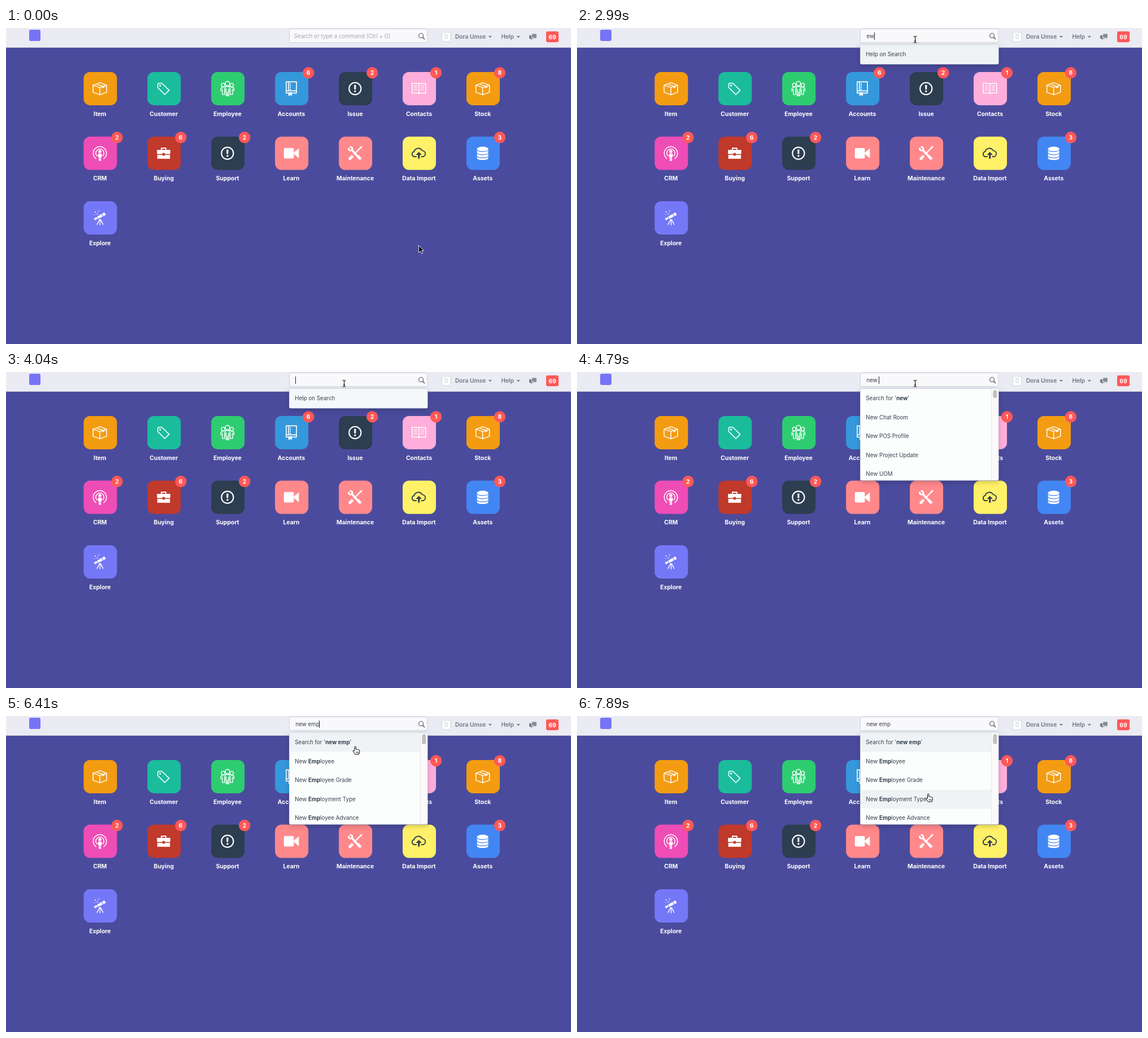
These frames come from a looping animation (1000x560 px, 8000 ms). An HTML page:

```html
<!DOCTYPE html>
<html lang="en">
<head>
<meta charset="utf-8">
<title>Desk search</title>
<style>
  html, body { margin: 0; width: 100%; height: 100%; overflow: hidden; background: #4b4b9d; }
  svg { display: block; width: 100%; height: 100%; }
  text { font: 9.8px Inter, "Open Sans", sans-serif; fill: #36414c; white-space: pre; }
  .b { font-weight: 700; }
  .label { font-size: 10.4px; font-weight: 700; fill: #fff; text-anchor: middle; }
  .nav { font-size: 10.2px; font-weight: 600; fill: #6c7680; }
  .ln { fill: none; stroke: #fff; stroke-width: 1.5; stroke-linejoin: round; }
  .drop { filter: drop-shadow(0 3px 4px rgba(0, 0, 0, .18)); }
</style>
</head>
<body>
<svg id="stage" viewBox="0 0 1000 560"></svg>
<script>
const LOOP = 8000, ROW = 33.6;
const line = (d, w = 1.5, c = '#fff') => `<path class="ln" d="${d}" style="stroke:${c};stroke-width:${w}"/>`;
const fill = (d, c = '#fff') => `<path d="${d}" fill="${c}"/>`;
const disc = (x, y, r, c = '#fff') => `<circle cx="${x}" cy="${y}" r="${r}" fill="${c}"/>`;
const ring = (x, y, r, w = 1.5) => `<circle class="ln" cx="${x}" cy="${y}" r="${r}" style="stroke-width:${w}"/>`;
const box = (x, y, w, h, r, c, more = '') =>
  `<rect x="${x}" y="${y}" width="${w}" height="${h}" rx="${r}" fill="${c}" ${more}/>`;
const label = (x, y, s, cls = 'label') => `<text class="${cls}" x="${x}" y="${y}">${s}</text>`;

// Icons, drawn around 0,0
const icons = {
  box: line('M-12-6L0-10.5L12-6V6.5L0 11L-12 6.5ZM-12-6L0-2L12-6M0-2V11M-6.5-8.2L5.5-4') +
    fill('M4.6-4.6L8.4-6V-2L4.6-.5Z'),
  tag: line('M-10.5-6.8a2.8 2.8 0 0 1 2.8-2.8h4.4L9.7 3L2 10.6L-10.5-2Z') + ring(-6.3, -5.4, 1.1, 1.2),
  team: ring(0, -8.8, 4) + ring(-7.6, -6.4, 3.1, 1.3) + ring(7.6, -6.4, 3.1, 1.3) +
    line('M-4.5 5V-1.5Q-4.5-4 0-4T4.5-1.5V5M-2.4 0V12.5H2.4V0M0 5V12', 1.5) +
    line('M-6-2.5Q-11.5-3-11.5 0V5M-9 0V10.5H-5V3M6-2.5Q11.5-3 11.5 0V5M9 0V10.5H5V3', 1.4),
  ledger: line('M-4.5 8H-9V-12H9.2V8H1M-9 4H9M-5-12V4', 1.6) +
    fill('M-3-9.6h2v2h-2zM-3-6.3h2v2h-2zM-3-3h2v2h-2zM-3 .3h2v2h-2zM-5 6.5H1V13.5L-2 11L-5 13.5Z'),
  alert: ring(0, 0, 10.6, 2.1) + fill('M-1.7-6.5H1.7L1.3 1.5H-1.3Z') + disc(0, 4.7, 1.7),
  book: line('M0-8.2Q-1.5-9.3-4-9.3H-12V7.8H-3.5Q-1 7.8 0 9Q1 7.8 3.5 7.8H12V-9.3H4Q1.5-9.3 0-8.2V9') +
    line('M-9-5H-3M-9-1.3H-3M-9 2.4H-3M3-5H9M3-1.3H9M3 2.4H9', 1.3),
  cast: line('M-6.5 9.8A11.7 11.7 0 1 1 6.5 9.8M-5 5A7.2 7.2 0 1 1 5 5') + disc(0, -3, 2.8) +
    fill('M-3.5 1.5Q0-.6 3.5 1.5V6.5H2V13.5H-2V6.5H-3.5Z') + line('M0 7V12', .8, '#ef4db6'),
  bag: fill('M-11.7-6H11.7V1.2H2V-.4H-2V1.2H-11.7ZM-11.2 2.7H-2V4.2H2V2.7H11.2V9.7H-11.2Z') +
    line('M-4-6V-9H4V-6', 1.8),
  video: box(-13, -9.3, 17.5, 18.6, 1.8, '#fff') + fill('M4.5-1.2L13.5-8.8V8.8L4.5 1.2Z'),
  tools: line('M-6-6L8.5 9.5', 3.6) + ring(-8, -8, 3.2, 2.8) + fill('M-9-9L-14-10L-10-14Z', '#ff888b') +
    line('M-10.5 11L-4 4.5', 4.6) + line('M-2 2L10-10', 2.4) + fill('M8-10.5L12-13L13.2-11.8L10.5-8Z') +
    line('M4.5 5L10.5 11', 5) + disc(9.4, 10, .9, '#ff888b'),
  cloud: line('M-4 6H-8A4.6 4.6 0 0 1-8.3-3A7.7 7.7 0 0 1 6-4.6A5.4 5.4 0 0 1 7.5 6H4', 1.9, '#36414c') +
    fill('M0-2.5L5.3 3H1.6V9.5H-1.6V3H-5.3Z', '#36414c'),
  data: fill('M-10-7.5V8.5C-10 13.2 10 13.2 10 8.5V-7.5Z') +
    '<ellipse cy="-7.8" rx="10" ry="3.9" fill="#fff"/>' +
    line('M-10-6.5C-10-2 10-2 10-6.5M-10-.8C-10 3.7 10 3.7 10-.8M-10 4.8C-10 9.3 10 9.3 10 4.8', 1.2, '#4286f4'),
  scope: fill('M-10.5 1.2L-5.5-1.8L-3.6 1.4L-8.8 4.2ZM-4.6-2.4L3-7L5.5-2.8L-2.6 1.6ZM4-7.5L8-9.8L10.6-5.5L6.5-3.2Z') +
    line('M.5 2.5V13M-.2 2.5L-5 12M1.2 2.5L6 12', 1.4) +
    disc(-8, -10.5, 1) + disc(-2, -12, .9) + disc(-4.5, -7, 1) + disc(-9.5, -6, .7)
};

const tiles = [
  ['Item', '#f39c12', 'box'], ['Customer', '#1abc9c', 'tag'], ['Employee', '#2ecc71', 'team'],
  ['Accounts', '#3498db', 'ledger', 6], ['Issue', '#2c3e50', 'alert', 2],
  ['Contacts', '#ffaedb', 'book', 1], ['Stock', '#f39c12', 'box', 8],
  ['CRM', '#ef4db6', 'cast', 2], ['Buying', '#c0392b', 'bag', 6], ['Support', '#2c3e50', 'alert', 2],
  ['Learn', '#ff888b', 'video'], ['Maintenance', '#ff888b', 'tools'],
  ['Data Import', '#fff168', 'cloud'], ['Assets', '#4286f4', 'data', 3],
  ['Explore', '#7578f6', 'scope']
];

function tile([name, color, icon, count], i) {
  const x = 166.9 + (i % 7) * 112.92, y = 107.4 + Math.floor(i / 7) * 114.6;
  return `<g transform="translate(${x} ${y})">` + box(-29.5, -29.5, 59, 59, 11.5, color) +
    `<g transform="translate(-.8 0)">${icons[icon]}</g>` + label(-.6, 48.2, name) +
    (count ? disc(29.6, -28, 10.2, '#ff5858') + label(29.4, -24.2, count) : '') + '</g>';
}

const header = box(0, 0, 1000, 34.5, 0, '#ebebf4') + box(0, 34, 1000, .8, 0, '#d1d3e0') +
  box(41, 3, 20, 20, 3, '#7574f6') +
  box(501.5, 1.5, 244.5, 24.5, 2, '#f9f9fb', 'stroke="#cdd1d8"') +
  '<circle cx="734.5" cy="13.5" r="4" fill="none" stroke="#4d5560" stroke-width="1.1"/>' +
  line('M737.4 16.4L741 20', 1.5, '#4d5560') +
  box(771.5, 7.5, 15.5, 16.5, 2, '#fff', 'stroke="#d1d8dd"') +
  '<text x="779.2" y="19.4" text-anchor="middle" style="fill:#c3c6ca">D</text>' +
  label(795, 18.8, 'Dora Umse', 'nav') + label(876.5, 18.8, 'Help', 'nav') +
  fill('M853.5 14h6.6l-3.3 3.4zM903.5 14h6.6l-3.3 3.4z', '#7b858e') +
  fill('M931 10.5h8v6.5h-1.3v2.3l-2.3-2.3h-4.4z', '#858c95') +
  fill('M926 13h4v5h4.5v1h-3.4l-2.3 2.4v-2.4h-2.8z', '#737b84') +
  box(956, 6, 22, 19.3, 3, '#ff5858') + label(967, 19.5, '69');

const cursors = {
  arrow: '<path d="M.5.5V13L3.4 10.3L5.5 15L7.6 14L5.6 9.5H9.3Z" fill="#000" stroke="#fff" stroke-width=".9"/>',
  hand: '<path d="M-1 8V1.2Q-1 0 .2 0T1.4 1.2V5Q2.8 4.2 3.6 5.4Q5 4.8 5.7 6Q7.8 5.6 7.8 7.5V10L6.4 14H0' +
    'L-3.6 8.8Q-4.2 7.4-2.8 7.2Z" fill="#fff" stroke="#000" stroke-width="1"/>' +
    line('M1.8 9V12M3.6 9V12M5.4 9V12', .7, '#000'),
  beam: line('M-3-6Q-.4-6 0-4.6Q.4-6 3-6M0-5V5M-3 6Q-.4 6 0 4.6Q.4 6 3 6M-1.5 2.5H1.5', 2.2, '#fff') +
    line('M-3-6Q-.4-6 0-4.6Q.4-6 3-6M0-5V5M-3 6Q-.4 6 0 4.6Q.4 6 3 6M-1.5 2.5H1.5', 1.1, '#000')
};

// Bars mark bold parts
const lists = [
  ['Help on Search'],
  ["Search for '|new|'", 'New Chat Room', 'New POS Profile', 'New Project Update', 'New UOM'],
  ["Search for '|new e|'", 'New |E|vent', 'New |E|mployee', 'New |E|mail Alert', 'New |E|xpense Claim'],
  ["Search for '|new emp|'", 'New |Emp|loyee', 'New |Emp|loyee Grade', 'New |Emp|loyment Type', 'New |Emp|loyee Advance']
];

// time, typed text, list
const typing = [
  [0, null], [2550, '', 0], [2990, 'ew', 0], [3140, 'ew', 0], [3890, 'e', 0], [4040, '', 0],
  [4490, 'n', 0], [4640, 'new', 1], [4790, 'new ', 1], [4940, 'new e', 1], [5080, 'new e', 2],
  [5820, 'new em', 2], [5960, 'new emp', 2], [6110, 'new emp', 3]
];

// time, cursor, x, y
const moves = [
  [0, 'arrow', 730, 385], [290, 'arrow', 702, 376], [470, 'arrow', 689.8, 373],
  [1670, 'hand', 615.2, 85.5], [1820, 'arrow', 607, 46], [1960, 'beam', 604, 11],
  [2100, 'beam', 600, 18], [2250, 'beam', 598.5, 20.5], [6410, 'hand', 618, 54]
];

const stage = document.getElementById('stage');
stage.innerHTML = '<defs><clipPath id="clip"><rect x="501" y="29" width="245" height="162.5"/></clipPath></defs>' +
  box(0, 0, 1000, 560, 0, '#4b4b9d') + tiles.map(tile).join('') + header +
  '<text id="typed" x="512.5" y="18"></text><path id="caret" stroke="#222"/>' +
  '<g id="menu"></g><g id="cursor"></g>';
const [typed, caret, menu, cursor] = ['typed', 'caret', 'menu', 'cursor'].map(id => document.getElementById(id));

const last = (keys, t) => keys.filter(k => k[0] <= t).pop();
const rich = s => s.split('|').map((p, i) => i % 2 ? `<tspan class="b">${p}</tspan>` : p).join('');

function pointer(t) {
  let [start, kind, x, y] = last(moves, t);
  if (start === 6410) {
    const p = Math.min(1, Math.floor((t - start) / 146) / 6), e = p * p * (3 - 2 * p);
    x += 3.5 * e;
    y += 84 * e;
  }
  return { kind, x, y };
}

function menuMarkup(list, t, y) {
  const rows = lists[list], long = list > 0, h = long ? 163 : 35;
  let s = box(501.5, 29.5, 244.5, h - .5, 2, '#fcfdfd', 'class="drop" stroke="#d1d8dd"');
  let body = '';
  if (!long) body += box(502, 30, 243.5, 33.8, 1, t < 3140 ? '#eff3f5' : '#f5f8fa');
  const hover = t >= 6410 ? Math.floor((y - 29.5) / ROW) : -1;
  rows.forEach((r, i) => {
    if (hover === i || (hover >= 0 && i === 0))
      body += box(502, 29.8 + i * ROW, 231, ROW, 0, '#eff3f5');
    body += label(511.3, 50 + i * ROW, rich(r), '');
  });
  if (long) body += box(733, 30, 12.5, 161.5, 0, '#fafafa') + box(733, 30, .8, 161.5, 0, '#e6e6e6') +
    box(736.3, 32, 7, list === 1 ? 14 : 18, 3.5, '#c1c1c1');
  return s + `<g clip-path="url(#clip)">${body}</g>`;
}

let shown = {};
function put(el, key, markup) {
  if (shown[key] !== markup) el.innerHTML = shown[key] = markup;
}

function draw(t) {
  const [start, text, list] = last(typing, t), p = pointer(t), idle = text === null;
  put(typed, 'typed', idle ? 'Search or type a command (Ctrl + G)' : text);
  typed.setAttribute('x', idle ? 509.8 : 512.5);
  typed.style.fill = idle ? '#a3a8ae' : '#36414c';
  const on = !idle && Math.floor((t - start) / 450) % 2 === 0;
  const cx = Math.floor(512.5 + (text ? typed.getComputedTextLength() : 0)) + .5;
  caret.setAttribute('d', on ? `M${cx} 8V21` : '');
  put(menu, 'menu', idle ? '' : menuMarkup(list, t, p.y));
  put(cursor, 'cursor', cursors[p.kind]);
  cursor.setAttribute('transform', `translate(${p.x} ${p.y})`);
}

const begin = performance.now();
function tick() {
  draw((performance.now() - begin) % LOOP);
  requestAnimationFrame(tick);
}
tick();
</script>
</body>
</html>
```
